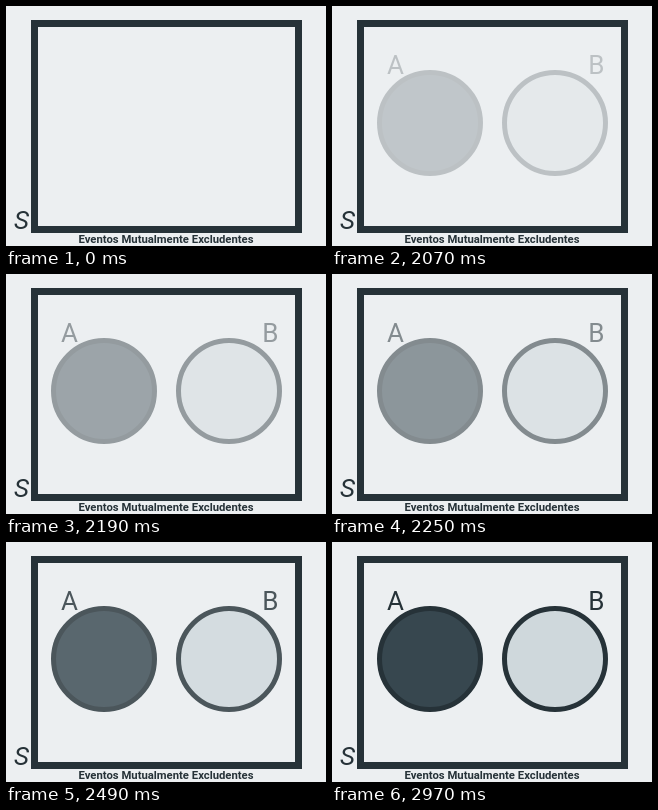
Animation of 320x240 px, one loop 4240 ms. Source, as an HTML page:

```html
<!DOCTYPE html>
<html lang="pt">
<head>
<meta charset="utf-8">
<title>Eventos Mutualmente Excludentes</title>
<style>
  html, body { margin: 0; width: 100%; height: 100%; overflow: hidden; background: #eceff1; }
  svg { display: block; width: 100%; height: 100%; }
  text { font-family: Roboto, sans-serif; font-size: 26px; fill: #263238; }
  .frame, circle { stroke: #263238; }
  .frame { fill: none; stroke-width: 7; }
  circle { stroke-width: 5; }
  .caption { font-size: 11.3px; font-weight: 700; text-anchor: middle; }
</style>
</head>
<body>
<svg viewBox="0 0 320 240">
  <rect class="frame" x="28.5" y="17.5" width="264" height="206"/>
  <text x="8" y="223" font-style="italic">S</text>
  <text class="caption" x="160" y="237">Eventos Mutualmente Excludentes</text>
  <g id="events" opacity="0">
    <circle cx="98" cy="117" r="50.5" fill="#37474f"/>
    <circle cx="223" cy="117" r="50.5" fill="#cfd8dc"/>
    <text x="55" y="68">A</text>
    <text x="256.3" y="68">B</text>
  </g>
</svg>
<script>
  const LOOP = 4240, FADE_START = 1950, STEP = 60, STEPS = 16;
  const events = document.getElementById('events');
  const start = performance.now();

  function draw() {
    const time = Math.max(0, performance.now() - start) % LOOP;
    const step = Math.floor((time - FADE_START) / STEP);
    const progress = Math.min(1, Math.max(0, step / STEPS));
    events.setAttribute('opacity', 1 - (1 - progress) ** 2);
    requestAnimationFrame(draw);
  }
  draw();
</script>
</body>
</html>
```
